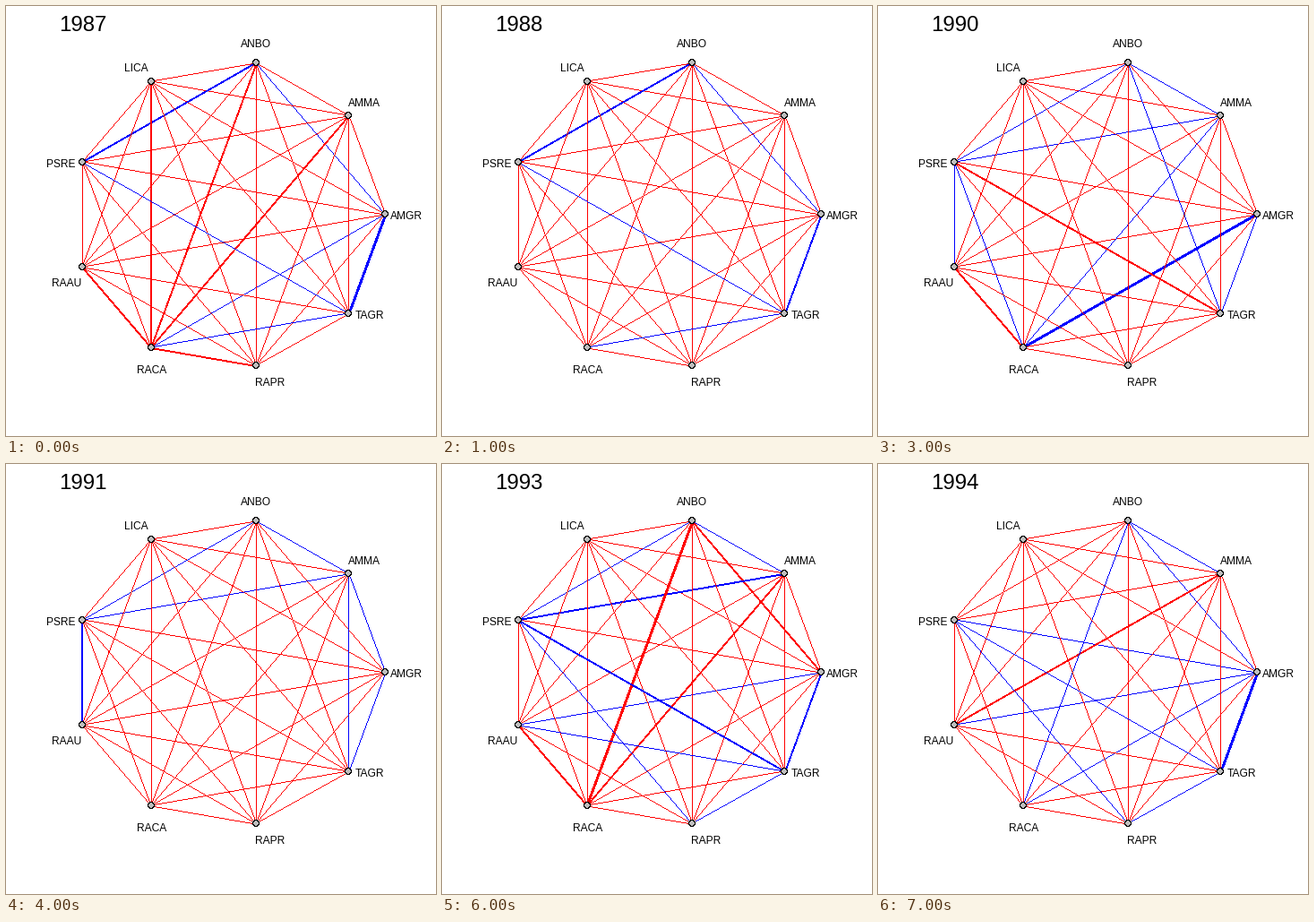
A matplotlib script for the animation above (8000 ms loop, 480 by 480 pixels).

```python
import numpy as np
import matplotlib.pyplot as plt
from itertools import combinations
from matplotlib.animation import FuncAnimation

SIZE = 480
DPI = 96
PT = 72 / DPI  # points per pixel
RED, BLUE = (255, 0, 0), (0, 0, 255)
GREY, BLACK = (190, 190, 190), (0, 0, 0)
NODE_R = 4

# code: label centre x, label baseline y
LABELS = {
    "AMGR": (446.5, 238),
    "AMMA": (399.5, 112),
    "ANBO": (278.5, 46),
    "LICA": (145.5, 73),
    "PSRE": (61.5, 180),
    "RAAU": (68, 313),
    "RACA": (162.5, 410),
    "RAPR": (294.5, 424),
    "TAGR": (405.5, 349),
}

# Per year: blue links, then heavy red links; all other links are thin red.
# A trailing digit is the width in pixels.
YEARS = {
    1987: ("ANBO-PSRE2 AMGR-TAGR3 AMGR-ANBO PSRE-TAGR AMGR-RACA RACA-TAGR",
           "LICA-RACA2 ANBO-RACA2 AMMA-RACA2 RAAU-RACA2 RACA-RAPR2"),
    1988: ("ANBO-PSRE2 AMGR-TAGR2 AMGR-ANBO PSRE-TAGR RACA-TAGR", ""),
    1989: ("ANBO-PSRE3 AMGR-ANBO ANBO-TAGR AMGR-PSRE PSRE-TAGR AMGR-TAGR", ""),
    1990: ("ANBO-PSRE AMMA-ANBO AMMA-PSRE ANBO-TAGR PSRE-RAAU PSRE-RACA AMMA-RACA "
           "AMGR-RACA3 AMGR-TAGR", "PSRE-TAGR2 RAAU-RACA2"),
    1991: ("ANBO-PSRE AMMA-ANBO AMMA-PSRE AMGR-AMMA AMMA-TAGR AMGR-TAGR PSRE-RAAU2", ""),
    1992: ("ANBO-PSRE2 AMMA-ANBO2 AMMA-TAGR2 AMMA-PSRE AMGR-AMMA AMGR-TAGR3 "
           "RACA-TAGR", "ANBO-RAAU2"),
    1993: ("ANBO-PSRE AMMA-ANBO AMMA-PSRE2 PSRE-TAGR2 PSRE-RAPR "
           "AMGR-RAAU RAAU-TAGR AMGR-TAGR2 RAPR-TAGR",
           "ANBO-RACA3 AMMA-RACA2 AMGR-ANBO2 RAAU-RACA2"),
    1994: ("AMMA-ANBO AMGR-ANBO ANBO-RACA AMGR-PSRE PSRE-TAGR PSRE-RAPR "
           "AMGR-RAAU AMGR-RACA AMGR-TAGR3 RAPR-TAGR", "AMMA-RAAU2"),
}

YY, XX = np.indices((SIZE, SIZE))


def ring():
    """Nine points on a circle, stretched to fill a square."""
    a = np.arange(len(LABELS)) * 2 * np.pi / len(LABELS)
    fit = lambda v: 2 * (v - v.min()) / np.ptp(v) - 1
    pts = np.column_stack([254.4 + 169 * fit(np.cos(a)),
                           232.8 - 169 * fit(np.sin(a))])
    return dict(zip(LABELS, pts))


NODES = ring()


def draw_line(img, p, q, width, color):
    """Hard-edged line between node rims, measured across its minor axis."""
    rim = (q - p) / np.hypot(*(q - p)) * NODE_R
    (x0, y0), (x1, y1) = np.floor(p + rim), np.floor(q - rim)
    dx, dy = x1 - x0, y1 - y0
    if abs(dx) >= abs(dy):
        offset = YY - (y0 + (XX - x0) * dy / dx)
        inside = (XX >= min(x0, x1)) & (XX <= max(x0, x1))
    else:
        offset = XX - (x0 + (YY - y0) * dx / dy)
        inside = (YY >= min(y0, y1)) & (YY <= max(y0, y1))
    span = 1 if width == 1 else width * np.hypot(dx, dy) / max(abs(dx), abs(dy))
    img[inside & (offset >= -span / 2) & (offset < span / 2)] = color


def draw_node(img, p):
    x, y = np.floor(p) - 0.5
    r = np.hypot(XX - x, YY - y)
    img[r <= NODE_R - 0.1] = BLACK
    img[r <= NODE_R - 1.1] = GREY


def parse(links, color):
    return {s[:9]: (int(s[9:] or 1), color) for s in links.split()}


def render(year):
    blue, heavy = YEARS[year]
    styles = {**parse(blue, BLUE), **parse(heavy, RED)}
    img = np.full((SIZE, SIZE, 3), 255, np.uint8)
    for a, b in combinations(NODES, 2):
        width, color = styles.get(f"{a}-{b}", (1, RED))
        draw_line(img, NODES[a], NODES[b], width, color)
    for p in NODES.values():
        draw_node(img, p)
    return img


plt.rcParams["font.family"] = "Liberation Sans"
fig = plt.figure(figsize=(SIZE / DPI, SIZE / DPI), dpi=DPI, facecolor="white")
ax = fig.add_axes([0, 0, 1, 1])
ax.axis("off")

years = list(YEARS)
graphs = [render(year) for year in years]
picture = ax.imshow(graphs[0], extent=(0, SIZE, SIZE, 0),
                    interpolation="nearest", aspect="auto")
for name, (x, y) in LABELS.items():
    ax.text(x, y, name, size=12 * PT, ha="center", va="baseline")
title = ax.text(59, 28, str(years[0]), size=24 * PT, va="baseline")


def update(i):
    picture.set_data(graphs[i])
    title.set_text(str(years[i]))
    return picture, title


anim = FuncAnimation(fig, update, frames=len(years), interval=1000,
                     repeat=True, repeat_delay=0, blit=False)
plt.show()
```
